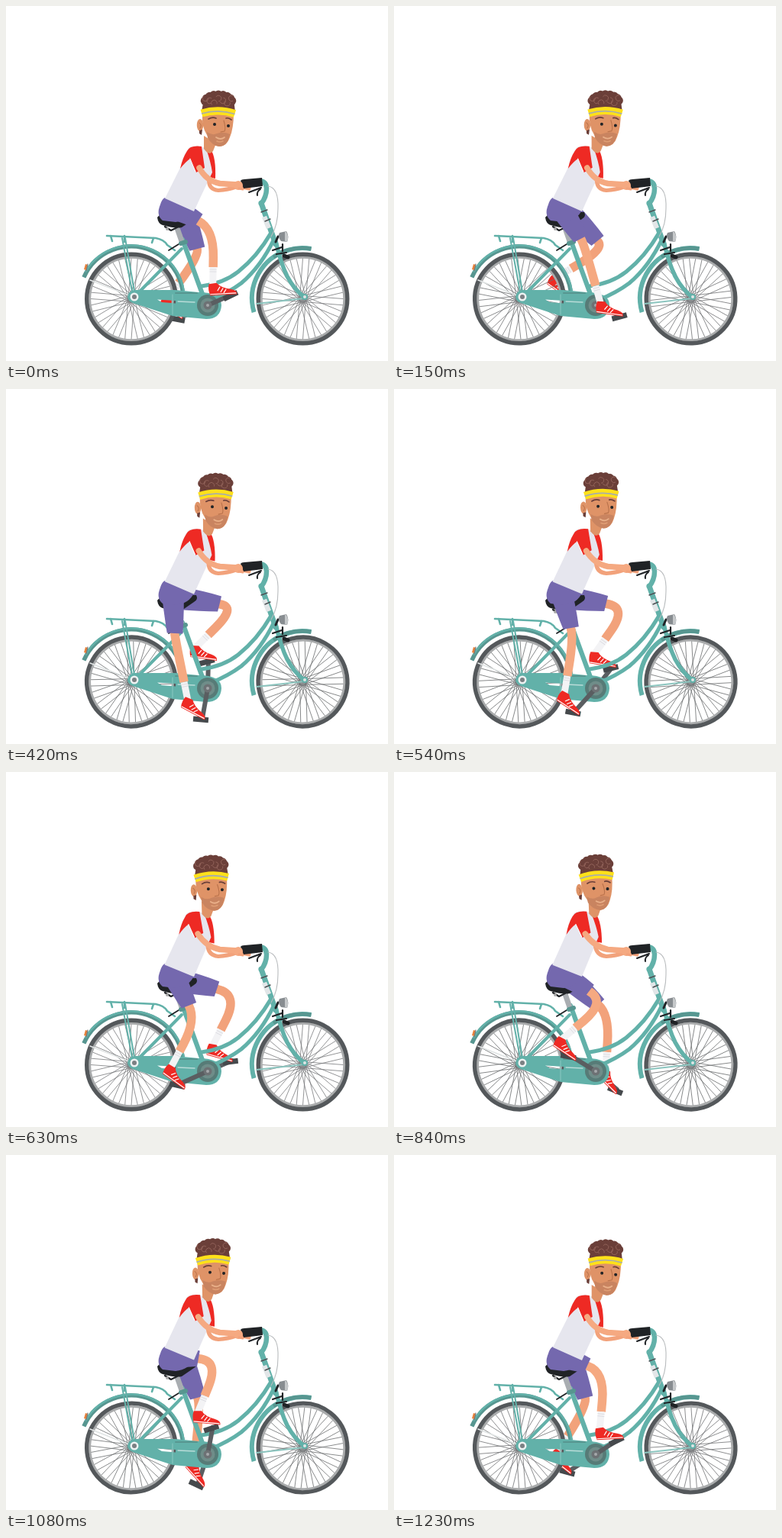
An HTML page with a canvas for the animation above (1260 ms loop, 500 px wide and 465 px high).

```html
<!DOCTYPE html>
<html lang="en">
<head>
<meta charset="utf-8">
<title>Cyclist</title>
<style>
html, body { margin: 0; width: 100%; height: 100%; overflow: hidden; background: #fff; }
canvas { display: block; }
</style>
</head>
<body>
<canvas id="stage" width="500" height="465"></canvas>
<script>
const ctx = document.getElementById('stage').getContext('2d');
const LOOP = 1260, STEP = 30, TAU = Math.PI * 2, RAD = Math.PI / 180;
const TEAL = '#62b1a9', TEAL_DARK = '#579690', DARK = '#4d5154', BLACK = '#202326';
const SKIN = '#f5a981', SHADE = '#f2a27b', FACE = '#df9367', BEARD = '#c98460';
const HAIR = '#6b3f39', RED = '#ee2a24', SHIRT = '#e6e6ee', PURPLE = '#7468ae';
const AXLE = [264, 392];

// time, knee x, knee y, shorts length, ankle x and y from the pedal, foot angle
const NEAR = [
  [0, 272, 292, 38, -23, -12, -3],
  [270, 231, 322, 56, -24, -20, 17],
  [420, 221, 324, 56, -17, -24, 28],
  [630, 249, 325, 47, -9, -22, 36],
  [840, 278, 301, 44, -10, -21, 34],
  [1080, 279, 269, 34, -18, -19, 5],
  [1230, 276, 284, 37, -22, -13, -3]
];
const FAR = [
  [0, 253, 326, 46, -13, -27, 34],
  [270, 293, 308, 46, -13, -23, 33],
  [420, 302, 285, 46, -16, -17, 8],
  [630, 305, 291, 43, -24, -19, 16],
  [840, 282, 318, 45, -13, -25, 45],
  [1080, 254, 326, 46, -3, -27, 48],
  [1230, 253, 326, 46, -13, -25, 38]
];
const SWAY = [[0, 0], [270, -2.5], [420, -3.5], [630, -9.5], [840, -13.5], [1080, -7], [1230, -1]];

// Smooth periodic interpolation of a table
function sample(rows, t) {
  const n = rows.length;
  const row = i => rows[(i + n) % n];
  const time = i => row(i)[0] + LOOP * Math.floor(i / n);
  let i = n - 1;
  while (rows[i][0] > t) i--;
  const t0 = time(i), span = time(i + 1) - t0, u = (t - t0) / span;
  const slope = (j, k) => (row(j + 1)[k] - row(j - 1)[k]) / (time(j + 1) - time(j - 1)) * span;
  return row(i).slice(1).map((a, k) => {
    k++;
    const b = row(i + 1)[k], d = b - a, m0 = slope(i, k), m1 = slope(i + 1, k);
    return a + u * (m0 + u * (3 * d - 2 * m0 - m1 + u * (m0 + m1 - 2 * d)));
  });
}

function fill(d, color, rule) {
  ctx.fillStyle = color;
  ctx.fill(new Path2D(d), rule || 'nonzero');
}

function line(d, color, width, cap = 'round') {
  ctx.strokeStyle = color;
  ctx.lineWidth = width;
  ctx.lineCap = cap;
  ctx.lineJoin = 'round';
  ctx.stroke(new Path2D(d));
}

function disc(x, y, r, color, ry = r) {
  ctx.fillStyle = color;
  ctx.beginPath();
  ctx.ellipse(x, y, r, ry, 0, 0, TAU);
  ctx.fill();
}

function arc(x, y, r, from, to, color, width) {
  ctx.strokeStyle = color;
  ctx.lineWidth = width;
  ctx.lineCap = 'butt';
  ctx.beginPath();
  ctx.arc(x, y, r, from * RAD, to * RAD);
  ctx.stroke();
}

function placed(x, y, deg, draw) {
  ctx.save();
  ctx.translate(x, y);
  ctx.rotate(deg * RAD);
  draw();
  ctx.restore();
}

function wheel(x, y, turn) {
  placed(x, y, turn, () => {
    let d = '';
    for (let i = 0; i < 40; i++) {
      const a = i * TAU / 40, b = a + (i % 2 ? 1.3 : -1.3);
      d += `M${4 * Math.cos(b)},${4 * Math.sin(b)}L${53 * Math.cos(a)},${53 * Math.sin(a)}`;
    }
    line(d, '#707274', 0.75);
    arc(0, 0, 54.3, 0, 360, '#a9abac', 3);
    arc(0, 0, 58.3, 0, 360, '#54585b', 5.4);
    disc(0, 0, 4, '#8b8e90');
  });
}

function pedalAt(deg) {
  return [259 + 38 * Math.cos(deg * RAD), 394.5 + 38 * Math.sin(deg * RAD)];
}

function crank([x, y], tilt) {
  line(`M${AXLE}L${x + 2},${y - 1}`, '#5a5e61', 6);
  placed(x, y, tilt, () => fill('M-10,-3H10V4H-10Z', '#45494c'));
}

function shoe() {
  fill('M-5,-3L5,-4Q11,3 23,5Q32,7 31,12H-4Q-7,4 -5,-3Z', RED);
  line('M-4,10.5H30', '#fff', 1.2, 'butt');
  line('M9,1.5L6,6M13,3.5L10,8M17,5L14,9', '#fff', 1.2);
}

function leg(hip, pose, pedal, skin) {
  const [kx, ky, len, dx, dy, tilt] = pose;
  const ax = pedal[0] + dx, ay = pedal[1] + dy;
  const dir = Math.atan2(ky - hip[1], kx - hip[0]);
  const hx = hip[0] + len * Math.cos(dir), hy = hip[1] + len * Math.sin(dir);
  const mx = (kx + ax) / 2, my = (ky + ay) / 2;
  const shin = Math.atan2(ay - my, ax - mx);
  const sx = ax - 25 * Math.cos(shin), sy = ay - 25 * Math.sin(shin);
  line(`M${hx - 8 * Math.cos(dir)},${hy - 8 * Math.sin(dir)}L${hx},${hy}Q${kx},${ky} ${mx},${my}L${sx},${sy}`, skin, 11.5, 'butt');
  line(`M${sx},${sy}L${ax},${ay}`, '#f3f3f5', 9, 'butt');
  placed(sx, sy, shin / RAD, () => line('M3,-4.5V4.5M6,-4.5V4.5', '#d9d9df', 0.8, 'butt'));
  placed(ax, ay, tilt, shoe);
  placed(hip[0], hip[1], dir / RAD, () =>
    fill(`M-6,-15Q${len / 2},-14 ${len + 1},-10.5L${len - 1},10Q${len / 2},13 -6,15Z`, PURPLE));
}

function rearParts() {
  arc(164, 383, 68, -156, -8, TEAL_DARK, 5.5);
  arc(164, 383, 69.3, -150, -8, TEAL, 2.6);
  fill('M104,338L107,339L105,346L102,345Z', '#e8823c');
  line('M107,338L105,347', '#777', 1.2);
  line('M132,301L196,304Q207,306 211,313L221,320', TEAL, 2.6);
  line('M137,301L139,308M155,301V309M193,304L191,310', TEAL, 2.6);
  line('M152,304L165,374M156,304L168,374', TEAL, 2);
  line('M110,359L166,381', '#e0e4e4', 1.6);
  line('M213,320L226,312', BLACK, 1.8);
  line('M168,381L230,318', TEAL, 4);
}

function frontParts() {
  arc(388, 383, 66, 164, 280, TEAL, 6);
  arc(388, 383, 66, 235, 280, TEAL_DARK, 5);
  line('M328,390L390,383', '#8cc5bf', 1.8);
  line('M353,308Q360,338 368,354Q377,371 391,382', TEAL, 5.5);
  disc(391, 381, 4, TEAL);
  disc(391, 381, 2, '#dfe5e5');
  line('M347,297Q329,328 304,348Q285,363 256,367', TEAL, 5.2);
  line('M351,305Q334,341 308,363Q292,375 268,385', TEAL, 5.2);
  line('M334,258L353,312', TEAL, 7);
  line('M338,276L344,291', '#e2e6e8', 6.5, 'butt');
  line('M334,270L342,267M339,282L346,279', DARK, 1.4);
  line('M334,259Q341,250 341,239Q341,230 332,229', TEAL, 6.5);
  line('M343,236Q357,238 356,265Q356,287 347,302', '#b9bcbe', 1.1);
  line('M356,302L353,309', BLACK, 3);
  fill('M358,297L367,295Q371,301 368,309L360,308Q355,302 358,297Z', '#888d91');
  fill('M366,295Q371,301 368,309L365,308V296Z', '#c5c8ca');
  line('M349,320L361,316M354,325L367,323M362,312V321', BLACK, 2.2);
  line('M364,327L369,329', BLACK, 5);
}

function chainCase() {
  line('M231,306L258,380', TEAL, 6.2);
  line('M224,291L231,311', '#a9adb1', 7, 'butt');
  line('M229,311L235,309', TEAL_DARK, 6);
  fill('M168,372H222L252,375Q282,375 282,392Q281,410 262,410L218,406L172,391Q159,388 159,381Q160,373 168,372Z' +
    'M198,384.5L222,386V389.5L204,388Z', TEAL, 'evenodd');
  line('M222,376H250', TEAL_DARK, 2);
  line('M225,387L247,388', '#b9dcd8', 1.4);
  line('M218,378V404', '#8ac8c1', 1);
  disc(168, 381, 5.5, '#eef2f2');
  disc(168, 381, 3, '#7b8083');
  disc(264, 392, 14, '#577b77');
  disc(264, 392, 9.5, '#6f8d89');
}

function saddle() {
  fill('M198,277Q203,269 225,270L249,270Q252,276 246,279L230,290Q222,292 205,287Q199,285 198,277Z', BLACK);
  line('M208,289L216,294L224,290', BLACK, 2.2);
  disc(211, 292, 2, '#aaa');
}

function torso() {
  fill('M260,186L268,188Q275,198 274,226L265,224Z', RED);
  fill('M240,185Q252,181 262,187Q268,204 270,218Q257,245 246,269L208,252Q219,230 229,210Q232,195 240,185Z', SHIRT);
  fill('M237,190Q241,182 256,184L260,212L249,218Q244,208 241,200Q235,204 228,213Q231,199 237,190Z', RED);
  line('M241,200L248,217', '#fff', 1);
  fill('M259,170L275,180L271,190Q266,197 259,187Z', FACE);
}

function head() {
  fill('M257,142Q256,158 263,169Q269,183 279,184Q289,184 293,172Q298,160 298,140Z', FACE);
  disc(254, 156, 4.2, FACE, 8);
  line('M253,153Q257,156 254,160', '#b9724b', 1);
  fill('M253,163L257,162L256,169L253,167Z', HAIR);
  fill('M263,165Q270,170 276,167Q285,164 293,168Q290,184 279,184Q270,183 264,173Z', BEARD);
  line('M275,172Q281,176 286,172', '#eab089', 1.8);
  line('M276,177Q280,179 284,177', '#df9d74', 1.6);
  line('M285,150Q288,160 286,164L281,165', '#b9724b', 1.1);
  disc(273, 155, 2, BLACK);
  disc(291, 157, 2, BLACK);
  line('M265,148Q270,145 275,147M288,147Q291,146 295,149', HAIR, 1.7);
  fill('M256,138L259,122Q278,112 298,122L300,139Z', HAIR);
  for (let i = 0; i < 9; i++) {
    const a = (190 + i * 20) * RAD;
    disc(278 + 18 * Math.cos(a), 126 + 10 * Math.sin(a), 5.5, HAIR);
  }
  for (let i = 0; i < 7; i++) {
    arc(261 + i * 5.7, 121 + (i % 3) * 3, 3.8, i * 70, i * 70 + 240, '#9a6a60', 0.8);
  }
  line('M256,140.5Q278,134 299.5,141', '#ffe11a', 10, 'butt');
  line('M256,141Q278,134.5 299.5,141.5', '#a8aeaa', 1.8, 'butt');
}

function grip() {
  fill('M307,229Q308,227 312,227L335,225L336,236L311,239Z', BLACK);
  line('M334,238L318,244M333,240Q328,243 329,248', BLACK, 2);
}

function arms(sx) {
  line(`M${266 + sx},226Q264,240 278,241.5Q290,241 304,236L318,239`, SHADE, 5.2);
  grip();
  line(`M${253 + sx},212Q262,229 280,232.5L303,234`, SKIN, 7.5);
  disc(304, 235, 6, SKIN);
  line('M305,239L310,240', SHADE, 3);
}

function draw(t) {
  const spin = t / LOOP * 360, angle = spin - 24;
  const nearPose = sample(NEAR, t), farPose = sample(FAR, t), sway = sample(SWAY, t)[0];
  const nearPedal = pedalAt(angle), farPedal = pedalAt(angle + 180);

  ctx.fillStyle = '#fff';
  ctx.fillRect(0, 0, 500, 465);

  crank(farPedal, farPose[5] - 23);
  leg([234, 275], farPose, farPedal, SHADE);
  wheel(164, 383.5, spin);
  wheel(388.5, 383.5, spin);
  rearParts();
  frontParts();
  chainCase();
  saddle();
  crank(nearPedal, nearPose[5] - 23);
  disc(AXLE[0], AXLE[1], 5.5, '#6d7174');
  disc(AXLE[0], AXLE[1], 2, '#a5a8aa');
  leg([218, 264], nearPose, nearPedal, SKIN);
  fill('M208,251L246,267Q240,281 222,283L205,281Q196,274 202,260Q204,253 208,251Z', PURPLE);

  placed(225, 268, sway * 0.19, () => {
    ctx.translate(-225, -268);
    torso();
  });
  placed(277 + sway * 0.7, 183 + sway * 0.22, sway * 0.32, () => {
    ctx.translate(-277, -183);
    head();
  });
  arms(sway * 0.2);
}

const start = performance.now();
function frame() {
  const t = (performance.now() - start) % LOOP;
  draw(Math.floor(t / STEP) * STEP);
  requestAnimationFrame(frame);
}
frame();
</script>
</body>
</html>
```
